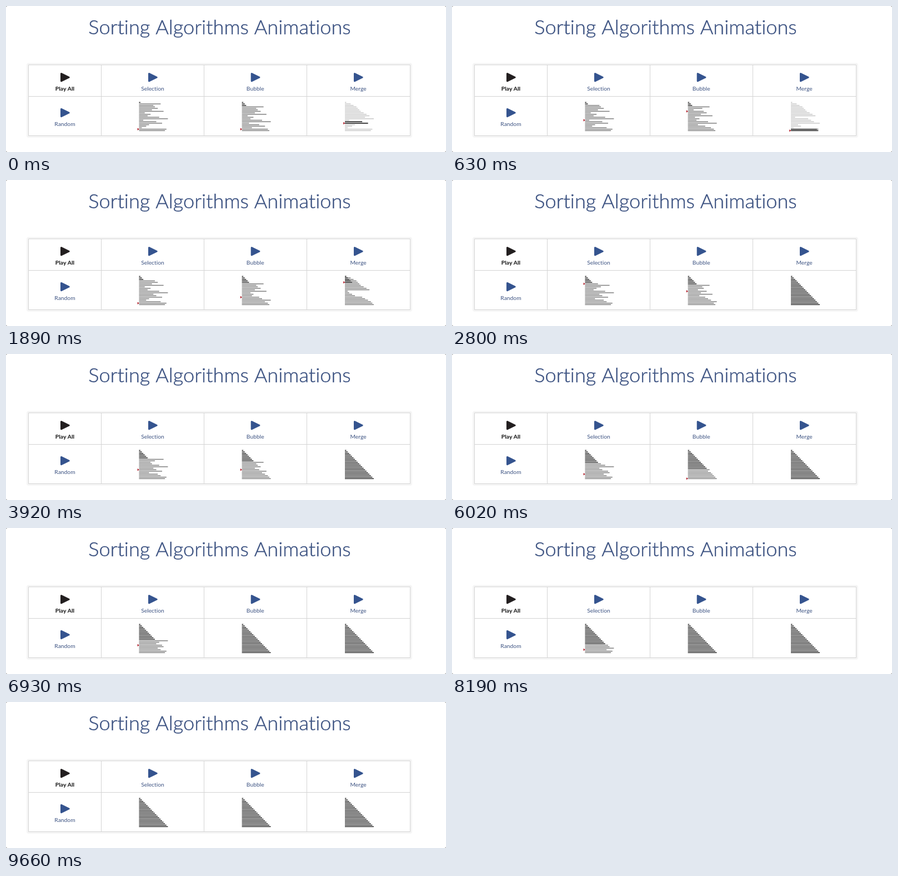
Animation of 792 by 264 pixels, one loop 9940 ms. Source, as an HTML page with a canvas:

```html
<!DOCTYPE html>
<html lang="en">
<head>
<meta charset="utf-8">
<title>Sorting Algorithms Animations</title>
<style>
  html, body { margin: 0; width: 100%; height: 100%; overflow: hidden; background: #fff; }
  canvas { display: block; font-variant-ligatures: none; }
</style>
</head>
<body>
<canvas id="stage" width="792" height="264"></canvas>
<script>
const ctx = document.getElementById('stage').getContext('2d');

const LOOP = 9940, TICK = 70;
const START = [1, 15, 10, 11, 13, 9, 17, 4, 8, 6, 14, 20, 3, 12, 16, 7, 5, 2, 19, 18];
const N = START.length;
const FIRST_STEP = 37; // the loop opens with the sorts already under way
const SORTED = [...START].sort((a, b) => a - b);
const BLUE = '#35548f', INK = '#231f20', TITLE = '#3d5382';
const DONE = '#1c1c1c', OPEN = '#777', IDLE = '#c4c4c4';

// time in ms -> algorithm steps taken, with short stalls
const PACE = [[0, 0], [630, 12], [1890, 35], [2800, 53], [5040, 96], [5110, 96], [6930, 131],
  [7140, 135], [7210, 135], [8190, 155], [8260, 155], [9100, 172], [9940, 188]];

function stepAt(t) {
  const k = PACE.findIndex(([end]) => t < end);
  const [t0, s0] = PACE[k - 1], [t1, s1] = PACE[k];
  return Math.round(s0 + (s1 - s0) * (t - t0) / (t1 - t0));
}

function selectionSteps() {
  const a = [...START], steps = [];
  for (let i = 0; i < N - 1; i++) {
    let min = i;
    for (let j = i; j < N; j++) {
      if (a[j] < a[min]) min = j;
      steps.push({ bars: [...a], mark: j, sorted: i });
    }
    [a[i], a[min]] = [a[min], a[i]];
  }
  return steps;
}

// each pass stops where the previous one made its last swap
function bubbleSteps() {
  const a = [...START], steps = [];
  for (let i = 0, lastSwap; i < N; i = lastSwap) {
    lastSwap = N;
    for (let j = N - 1; j > i; j--) {
      if (a[j] < a[j - 1]) {
        [a[j], a[j - 1]] = [a[j - 1], a[j]];
        lastSwap = j;
      }
      steps.push({ bars: [...a], mark: j, sorted: i });
    }
  }
  return steps;
}

function mergeSteps() {
  const a = [...START], steps = [];
  (function sort(lo, hi) {
    if (hi - lo < 2) return;
    const mid = lo + Math.floor((hi - lo) / 2);
    sort(lo, mid);
    sort(mid, hi);
    const source = [...a], out = [];
    for (let k = lo, i = lo, j = mid; k < hi; k++) {
      out[k] = i < mid && (j >= hi || source[i] <= source[j]) ? source[i++] : source[j++];
      steps.push({ bars: source, out: [...out], mark: k, lo, hi, sorted: 0 });
    }
    for (let k = lo; k < hi; k++) a[k] = out[k];
  })(0, N);
  return steps;
}

const CHARTS = [
  { x: 239.4, steps: selectionSteps() },
  { x: 424.6, steps: bubbleSteps() },
  { x: 610, steps: mergeSteps() }
];
const FINISHED = { bars: SORTED, sorted: N };

function text(str, x, y, font, color) {
  ctx.font = font;
  ctx.letterSpacing = '0.01px'; // keeps letters from joining
  ctx.fillStyle = color;
  ctx.fillText(str, x, y);
}

function button(label, x, y, color, weight = 400) {
  ctx.fillStyle = ctx.strokeStyle = color;
  ctx.lineWidth = 3;
  ctx.lineJoin = 'round';
  ctx.beginPath();
  ctx.moveTo(x - 6.5, y - 6.7);
  ctx.lineTo(x + 7.2, y);
  ctx.lineTo(x - 6.5, y + 6.7);
  ctx.closePath();
  ctx.fill();
  ctx.stroke();
  text(label, x, y + 24, `${weight} 10.3px Lato, sans-serif`, weight > 400 ? '#111' : TITLE);
}

function drawPage() {
  ctx.fillStyle = '#8a8a8a';
  ctx.fillRect(0, 0, 792, 264);
  ctx.fillStyle = '#fff';
  ctx.beginPath();
  ctx.roundRect(0, 0, 792, 264, 3);
  ctx.fill();

  const title = 'Sorting Algorithms Animations';
  ctx.textAlign = 'center';
  text(title, 384.5, 51, '300 36.2px Lato, sans-serif', TITLE);
  ctx.strokeStyle = TITLE;
  ctx.lineWidth = 0.5;
  ctx.strokeText(title, 384.5, 51);

  ctx.fillStyle = '#f5f5f5';
  ctx.beginPath();
  ctx.roundRect(37, 103, 694, 135, 4);
  ctx.fill();
  ctx.fillStyle = '#fff';
  ctx.fillRect(41, 107, 686, 128);
  ctx.strokeStyle = '#d4d4d4';
  ctx.lineWidth = 1;
  ctx.strokeRect(40.5, 106.5, 687, 128);
  ctx.beginPath();
  for (const x of [171.5, 356.5, 541.5]) {
    ctx.moveTo(x, 107);
    ctx.lineTo(x, 235);
  }
  ctx.moveTo(41, 163.5);
  ctx.lineTo(727, 163.5);
  ctx.stroke();

  button('Play All', 106, 129, INK, 700);
  button('Random', 106, 193, BLUE);
  button('Selection', 264, 129, BLUE);
  button('Bubble', 448.7, 129, BLUE);
  button('Merge', 634, 129, BLUE);
}

function drawChart(x, { bars, out = [], mark, lo = 0, hi = N, sorted }) {
  const rowY = k => 174.35 + k * 2.685;
  const bar = (value, k, color) => {
    ctx.fillStyle = color;
    ctx.fillRect(x, rowY(k) - 0.7, value * 2.6, 1.4);
  };
  bars.forEach((value, k) => {
    bar(value, k, k < sorted ? DONE : k >= lo && k < hi ? OPEN : IDLE);
    if (out[k]) bar(out[k], k, DONE);
  });
  if (mark === undefined) return;
  const y = rowY(mark);
  ctx.fillStyle = '#b3202c';
  ctx.beginPath();
  ctx.moveTo(x - 2.8, y - 2.2);
  ctx.lineTo(x + 0.4, y);
  ctx.lineTo(x - 2.8, y + 2.2);
  ctx.fill();
}

function frame() {
  const t = Math.floor((performance.now() % LOOP) / TICK) * TICK;
  const step = FIRST_STEP + stepAt(t);
  drawPage();
  for (const { x, steps } of CHARTS) drawChart(x, steps[step] || FINISHED);
  requestAnimationFrame(frame);
}
frame();
</script>
</body>
</html>
```
